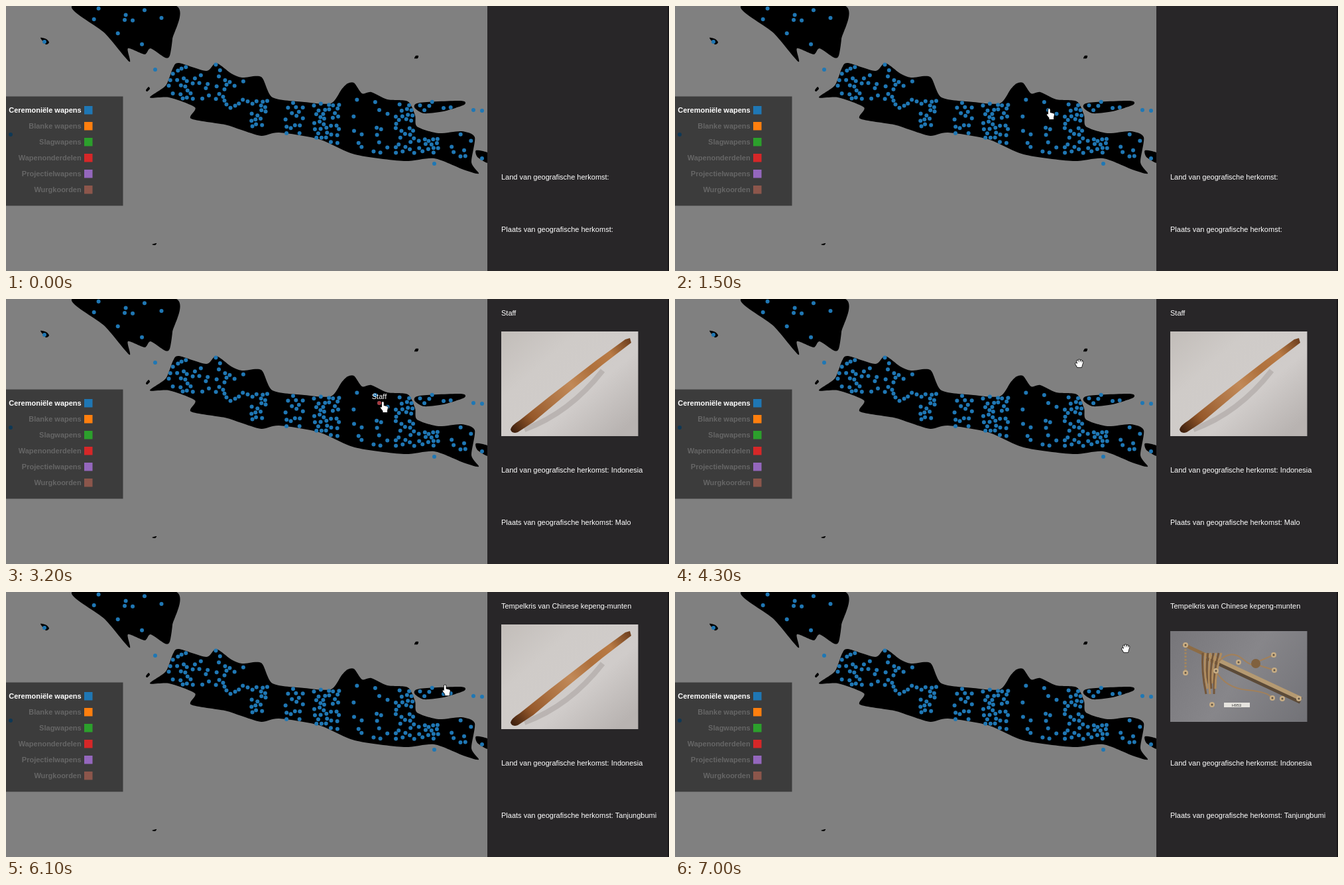
Recreate the animation shown at these times as an HTML page with a canvas. Size 1000 by 400 pixels, loop 7.2 s.

```html
<!DOCTYPE html>
<html lang="nl">
<head>
<meta charset="utf-8">
<style>
html, body { margin: 0; width: 100%; height: 100%; overflow: hidden; background: #282628; }
canvas { display: block; }
</style>
</head>
<body>
<canvas id="stage" width="1000" height="400"></canvas>
<script>
const ctx = document.getElementById('stage').getContext('2d');
const LOOP = 7200, BLUE = '#1f77b4';

// Closed smooth coast through a few key points.
function coast(points) {
  const p = points.split(' ').map(pair => pair.split(',').map(Number));
  const at = i => p[(i + p.length) % p.length];
  const path = new Path2D();
  path.moveTo(...p[0]);
  p.forEach((a, i) => {
    const before = at(i - 1), b = at(i + 1), after = at(i + 2);
    path.bezierCurveTo(
      a[0] + (b[0] - before[0]) / 8, a[1] + (b[1] - before[1]) / 8,
      b[0] - (after[0] - a[0]) / 8, b[1] - (after[1] - a[1]) / 8, ...b);
  });
  return path;
}
const land = new Path2D();
[
  '217,138 241,120 252,93 261,86 302,98 317,86 340,102 356,108 385,107 402,138 450,145 490,147 506,126 515,117 525,116 537,132 551,130 575,141 606,144 617,165 620,182 652,192 687,189 707,198 702,236 713,253 690,247 646,230 600,234 526,224 472,201 412,191 385,196 355,187 330,179 279,170 285,153 246,138',
  '101,-1 149,41 186,84 184,64 209,73 218,64 240,78 247,75 251,50 255,-1',
  '616,153 624,146 686,143 691,149 660,159 630,162',
  '709,218 727,222 727,237 711,228',
  '52,48 61,50 65,55 60,58',
  '616,79 618,75 622,75 621,79',
  '211,127 215,122 217,125 213,129',
  '220,360 227,358 225,361'
].forEach(points => land.addPath(coast(points)));

let seed = 29;
const random = () => (seed = seed * 16807 % 2147483647) / 2147483647;

// Offshore and hovered finds, then scattered ones that stay on land and apart.
const dots = [[563, 157], [660, 154], [58, 54], [225, 96], [7, 194], [646, 238], [705, 157], [718, 158], [718, 230]];
const regions = [ // x, y, half width, half height, count
  [185, 30, 60, 30, 9], [285, 112, 40, 30, 32], [345, 132, 20, 26, 13], [379, 163, 15, 20, 17],
  [435, 167, 14, 28, 15], [484, 177, 20, 30, 34], [548, 178, 28, 44, 15], [605, 185, 20, 38, 32],
  [639, 211, 13, 11, 12], [687, 212, 20, 22, 7], [650, 152, 25, 9, 4]
];
for (const [x, y, w, h, count] of regions)
  for (let left = count, tries = 0; left && tries < 500; tries++) {
    const px = x + (random() * 2 - 1) * w, py = y + (random() * 2 - 1) * h;
    if (!ctx.isPointInPath(land, px, py) || dots.some(d => Math.hypot(d[0] - px, d[1] - py) < 6)) continue;
    dots.push([px, py]);
    left--;
  }

const legend = [
  ['Ceremoniële wapens', BLUE], ['Blanke wapens', '#ff7f0e'], ['Slagwapens', '#2ca02c'],
  ['Wapenonderdelen', '#d62728'], ['Projectielwapens', '#9467bd'], ['Wurgkoorden', '#8c564b']
];
const items = [
  { title: 'Staff', place: 'Malo', dot: dots[0], hover: [1700, 3800], textAt: 2300, photoAt: 2600, photo: staffPhoto },
  { title: 'Tempelkris van Chinese kepeng-munten', place: 'Tanjungbumi', dot: dots[1],
    hover: [5500, 6100], textAt: 5900, photoAt: 6900, photo: krisPhoto }
];

const moves = [ // start, end, x, y
  [900, 900, 640, 235], [900, 1400, 567, 163], [1600, 1700, 571, 163],
  [3700, 4200, 610, 97], [4800, 5400, 648, 151], [5400, 5500, 662, 160], [6000, 6400, 680, 85]
];
const pointer = new Path2D('M-4-6Q-4-8-2.7-8-1.3-8-1.3-6V-2L4-.8Q5.2-.4 5 1L4 5V8H-2.5V6L-6 1.5Q-6.5 0-5 0L-4 1Z');
const grab = new Path2D('M-3 6L-6 1Q-6-.6-4.4 0L-3 1-4-3.5Q-3.4-5-2.4-4L-1.5-1-1.4-5Q-.4-6.4.5-5L.8-1 2-4.5Q3.2-5.4 3.6-4L3-.5 4.2-2.8Q5.6-3.2 5.5-1.8L4 3 3.2 6Z');
const arrow = new Path2D('M-4-7V5L-1.2 2.5.8 7 2.8 6 .8 1.8H4.6Z');

function rect(x, y, w, h, color) {
  ctx.fillStyle = color;
  ctx.fillRect(x, y, w, h);
}
function circle(x, y, r, color) {
  ctx.fillStyle = color;
  ctx.beginPath();
  ctx.arc(x, y, r, 0, 7);
  ctx.fill();
}
function text(str, x, y, { color = '#fff', align = 'left', weight = '', size = 11 } = {}) {
  ctx.font = `${weight} ${size}px "Liberation Sans", Arial, sans-serif`;
  ctx.textAlign = align;
  ctx.fillStyle = color;
  ctx.fillText(str, x, y);
}
function shape(d, color) {
  ctx.fillStyle = color;
  ctx.fill(new Path2D(d));
}
function line(d, color, width, dash = []) {
  ctx.strokeStyle = color;
  ctx.lineWidth = width;
  ctx.setLineDash(dash);
  ctx.stroke(new Path2D(d));
  ctx.setLineDash([]);
}
function gradient(x0, y0, x1, y1, ...colors) {
  const g = ctx.createLinearGradient(x0, y0, x1, y1);
  colors.forEach((c, i) => g.addColorStop(i / (colors.length - 1), c));
  return g;
}

function staffPhoto() {
  rect(747, 49, 206.5, 158, gradient(747, 49, 900, 225, '#c2bdb9', '#cfcbc8', '#d0ccca', '#b8b3b1'));
  line('M782 197Q850 172 900 108', 'rgba(105,95,90,.22)', 8);
  shape('M934 61L941 59 943 66 900 99 845 144 795 186 772 201Q763 204 761 197 762 191 775 183L820 147 890 93Z',
    gradient(762, 200, 942, 60, '#3a1d0c', '#96592b', '#ae7444', '#c18958', '#ae703c', '#b97b45', '#6b3c1c'));
}

function krisPhoto() {
  rect(747, 59, 206.5, 137, gradient(747, 59, 953, 196, '#77767a', '#87868a', '#727277'));
  line('M803 98L944 164', '#5b4a38', 10);
  line('M803 95L944 161', '#b59a72', 6);
  line('M766 79L803 96', '#8d6c45', 5);
  line('M770 81V122', '#a3855e', 3, [3, 2]);
  for (let i = 0; i < 8; i++)
    line(`M${796 + i * 4} 92Q${794 + i * 3} 120 ${801 + i * 2} ${154 - i % 3 * 8}`, i % 2 ? '#b08c5e' : '#75573a', 3);
  line('M815 118Q830 145 863 148T900 160M820 105Q838 86 856 101T877 106L903 95M872 108L904 118', '#a2805a', 2);
  circle(876, 108, 7, '#80613f');
  for (const [x, y] of [[770, 80], [770, 122], [810, 170], [816, 119], [850, 106], [903, 95], [904, 118], [901, 160], [916, 161], [941, 161]]) {
    circle(x, y, 4, '#c8ad84');
    circle(x, y, 1.5, '#5d5244');
  }
  rect(828, 167, 39, 7, '#e6e4df');
  text('H953', 847, 173, { color: '#333', align: 'center', size: 6 });
}

function drawCursor(t) {
  const done = moves.filter(move => t >= move[0]);
  if (!done.length) return;
  const [start, end, x1, y1] = done[done.length - 1];
  const [, , x0, y0] = done[Math.max(0, done.length - 2)];
  const u = Math.min(1, (t - start) / (end - start || 1)), k = u * u * (3 - 2 * u);
  const x = x0 + (x1 - x0) * k, y = y0 + (y1 - y0) * k;
  const onDot = items.some(({ dot }) => Math.hypot(dot[0] - x, dot[1] - y) < 11);
  const icon = onDot ? pointer : ctx.isPointInPath(land, x, y) ? arrow : grab;
  ctx.save();
  ctx.translate(x, y);
  ctx.lineWidth = 1.6;
  ctx.strokeStyle = '#111';
  ctx.stroke(icon);
  ctx.fillStyle = '#fff';
  ctx.fill(icon);
  ctx.restore();
}

function draw(t) {
  rect(0, 0, 726, 400, '#808080');
  ctx.fillStyle = '#000';
  ctx.fill(land);
  for (const [x, y] of dots) circle(x, y, 3, BLUE);

  rect(0, 136.5, 176.5, 165, 'rgba(0,0,0,.53)');
  legend.forEach(([label, color], i) => {
    const y = 157 + i * 24;
    text(label, 113.7, y + 4, { color: i ? '#666' : '#fff', align: 'right', weight: 'bold' });
    rect(118, y - 6, 12.5, 12.5, color);
  });

  for (const { title, dot: [x, y], hover } of items)
    if (t >= hover[0] && t < hover[1]) {
      circle(x, y, 3, '#a8393d');
      text(title, x, y - 6, { align: 'center' });
    }
  drawCursor(t);

  rect(726, 0, 274, 400, '#282628');
  rect(998.5, 0, 1.5, 400, '#121112');
  const shown = items.filter(item => t >= item.textAt).pop();
  const pictured = items.filter(item => t >= item.photoAt).pop();
  if (shown) text(shown.title, 747, 24.6);
  if (pictured) pictured.photo();
  text('Land van geografische herkomst:' + (shown ? ' Indonesia' : ''), 747, 262);
  text('Plaats van geografische herkomst:' + (shown ? ' ' + shown.place : ''), 747, 341);
}

const start = performance.now();
function tick() {
  const t = (performance.now() - start) % LOOP;
  draw(Math.floor(t / 100) * 100);
  requestAnimationFrame(tick);
}
tick();
</script>
</body>
</html>
```
